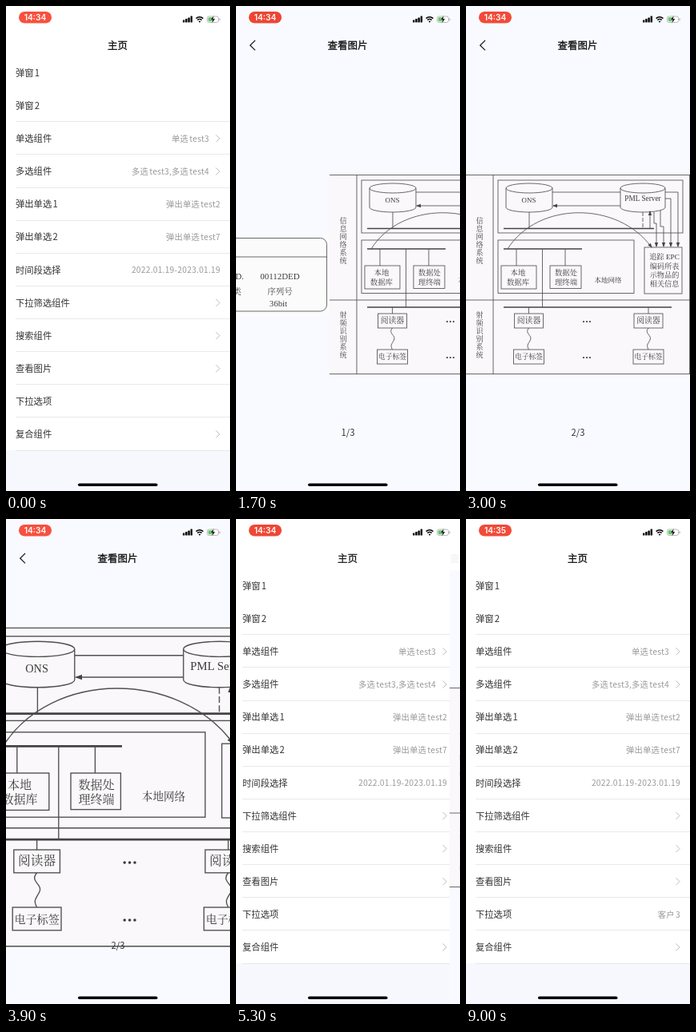
An HTML page that plays this animation: 280 px wide and 607 px high, repeating every 9100 ms.

```html
<!DOCTYPE html>
<html lang="zh-CN">
<head>
<meta charset="utf-8">
<title>主页</title>
<style>
html, body { margin: 0; width: 100%; height: 100%; overflow: hidden; background: #fff; }
#stage { display: block; width: 280px; height: 607px; font-family: "Noto Sans CJK SC", "Noto Sans CJK", "Noto Sans", sans-serif; }
.scan { font-family: "Liberation Serif", "Noto Serif CJK SC", "Noto Sans CJK SC", serif; fill: #3c3c3c; }
.scan .ink { fill: none; stroke: #505050; stroke-width: .85; }
.scan .bus { fill: none; stroke: #444; stroke-width: 1.7; }
.scan .dash { fill: none; stroke: #555; stroke-width: .9; stroke-dasharray: 5 2; }
.title { fill: #111; stroke: #111; stroke-width: .3; }
.time { font-family: Inter, sans-serif; }
</style>
</head>
<body>
<svg id="stage" viewBox="0 0 280 607"></svg>
<script>
const MID = 'middle', END = 'end';

// Text centred vertically on y
const text = (s, x, y, size, anchor = 'start', extra = '') =>
  `<text x="${x}" y="${y + size * .37}" font-size="${size}" text-anchor="${anchor}" ${extra}>${s}</text>`;
const path = (d, cls = 'ink', extra = '') => `<path class="${cls}" d="${d}" ${extra}/>`;
const arrow = (d, ends = 'marker-end="url(#tip)"') => path(d, 'ink', ends);
const box = (x, y, w, h, rx = 0) =>
  `<rect class="ink" x="${x}" y="${y}" width="${w}" height="${h}" rx="${rx}"/>`;
const label = (s, x, y, size) => text(s, x, y, size, MID);
const lines = (list, x, y, step, size) => list.map((s, i) => label(s, x, y + i * step, size)).join('');
const paper = (y, h, fill) => `<rect y="${y}" width="280" height="${h}" fill="${fill}"/>`;
const cylinder = (x, y, w, h, ry) => {
  const r = w / 2;
  return path(`M${x} ${y + ry}a${r} ${ry} 0 0 1 ${w} 0a${r} ${ry} 0 0 1 ${-w} 0V${y + h - ry}a${r} ${ry} 0 0 0 ${w} 0V${y + ry}`);
};
// Hollow block arrow; the head sits at x2
const block = (x1, x2, y) => {
  const n = x2 - Math.sign(x2 - x1) * 6;
  return path(`M${x1} ${y - 1.6}H${n}V${y - 3.6}L${x2} ${y}L${n} ${y + 3.6}V${y + 1.6}H${x1}Z`);
};
const pair = (x1, x2, y1, y2) => block(x1, x2, y1) + block(x2, x1, y2);
const oval = (x, y, rx, ry, s) =>
  `<ellipse class="ink" cx="${x}" cy="${y}" rx="${rx}" ry="${ry}"/>` + label(s, x, y, 7.4);

function codeTable() {
  const columns = [
    [40, '02.', '标头', '8bit'], [93, '0000A68.', 'EPC 管理器', '28bit'],
    [154, '00010D.', '对象类', '24bit'], [218, '00112DED', '序列号', '36bit']];
  return paper(288, 101, '#fcfbfc') +
    box(4.5, 290.5, 272, 91.5, 8) + path('M4 314H277') +
    text('产品电子码类型 1 96bit', 15, 304, 10.4) +
    columns.map(([x, code, name, bits]) =>
      label(code, x, 338, 10.9) + label(name, x, 357, 10.4) + label(bits, x - 2, 372, 10.8)).join('');
}

function networkDiagram() {
  const station = x =>
    path(`M${x} 377V385M${x} 403c-6 7 5 9 2 15s-5 6-2 12`) +
    box(x - 18, 385, 36, 18) + label('阅读器', x, 393.5, 9.8) +
    box(x - 19, 430, 38, 18) + label('电子标签', x, 439.2, 8.8);
  const side = (s, y) => lines([...s], 17, y, 9.9, 9);
  return paper(211, 250, '#faf8fa') +
    path('M0 211.5H280M34 211V461M279.5 211V461M0 368H280M0 460.5H280') +
    box(40, 218, 231, 66) + box(40, 293, 170, 66.5) +
    cylinder(50, 222, 58, 36, 6) + label('ONS', 78.5, 243, 8.9) +
    cylinder(193, 222, 56, 36, 6) + label('PML Server', 221, 241, 9.3) +
    path('M47 278.5H235M47 304H145M47 377H257', 'bus') +
    path('M79 258V278M63 304V325M124 304V325M95.5 304V377') +
    path('M221 258V278', 'dash') +
    path('M108 233H193') +
    arrow('M193 250H109') + arrow('M249 233H265V301') + arrow('M249 241H256V301') +
    arrow('M230 278V257') + arrow('M235 258V272H238V301') + arrow('M243 256V276H247V301') +
    arrow('M52 304C90 244 190 244 232 302') +
    box(44, 325, 44, 29) + lines(['本地', '数据库'], 65, 334, 11.2, 9.4) +
    box(105, 325, 39, 28.5) + lines(['数据处', '理终端'], 125, 334, 11.2, 9.4) +
    label('本地网络', 177.5, 343, 8.5) +
    box(223, 302, 47, 58) +
    lines(['追踪 EPC', '编码所表', '示物品的', '相关信息'], 248, 314, 11.2, 9.2) +
    station(78.5) + station(228) +
    [395, 440].map(y => [147, 151, 155].map(x => `<circle cx="${x}" cy="${y}" r="1.1"/>`).join('')).join('') +
    side('信息网络系统', 269) + side('射频识别系统', 387);
}

function flowDiagram() {
  const star = Array.from({ length: 28 }, (_, i) => {
    const a = i * Math.PI / 14 - Math.PI / 2, r = i % 2 ? 18 : 29;
    return `${36.5 + r * Math.cos(a)},${368 + r * 1.05 * Math.sin(a)}`;
  }).join(' ');
  const server = (y, name, below) =>
    label('EPC', 84, y - 9, 7.5) + pair(71, 100, y - 3, y + 4.5) + label(below, 88, y + 12, 7.5) +
    box(107, y - 6.5, 53, 14) + label(name, 133.5, y + .5, 7.4) +
    block(188, 215, y) + block(188, 161, y) +
    cylinder(217, y - 16, 34, 27, 4) + label('数据库', 234, y + 1.5, 7.4);
  return paper(272, 132, '#f8f6f8') +
    label('射频', 33, 276, 7.6) + oval(32, 291.5, 23.5, 11.5, 'EPC 标签') +
    label('EPC', 70, 279, 7.5) + pair(59, 87, 285.5, 295) +
    oval(112, 291, 22.5, 11.5, '阅读器') +
    label('EPC', 149, 282, 7.5) + block(138, 166, 289) +
    oval(194.5, 290.5, 22, 11.5, '中间件') + pair(222, 248, 283, 293) +
    box(251, 273, 24, 31) + lines(['企业', '应用', '软件'], 263, 281, 8.5, 7.6) +
    arrow('M237 309V298') + label('事件过滤', 238, 315, 7.2) +
    arrow('M36.5 337V317H194.5V303', 'marker-start="url(#tip)" marker-end="url(#tip)"') +
    `<polygon class="ink" points="${star}"/>` + label('Internet', 36.5, 368, 7.6) +
    server(351, 'ONS 服务器', 'IP 地址') + server(384.5, 'EPCIS 服务器', 'PML');
}

const rows = [
  ['弹窗 1'], ['弹窗 2'], ['单选组件', '单选 test3', 1], ['多选组件', '多选 test3,多选 test4', 1],
  ['弹出单选 1', '弹出单选 test2'], ['弹出单选 2', '弹出单选 test7'],
  ['时间段选择', '2022.01.19-2023.01.19'], ['下拉筛选组件', '', 1], ['搜索组件', '', 1],
  ['查看图片', '', 1], ['下拉选项', '客户 3'], ['复合组件', '', 1]];

function homeList() {
  return `<rect width="280" height="607" fill="#f6f8fd"/><rect width="280" height="556" fill="#fff"/>` +
    rows.map(([name, value, more], i) => {
      const y = 83.6 + i * 41.12;
      return text(name, 12, y, 11.3, 'start', 'fill="#333" word-spacing="-1.3"') +
        (value ? text(value, more ? 254 : 268, y + .3, 10.3, END,
          `fill="#999" letter-spacing=".22" word-spacing="-1.3" ${i === 10 ? 'id="choice"' : ''}`) : '') +
        (more ? `<path d="M262.5 ${y - 4.5}l4.5 4.5l-4.5 4.5" fill="none" stroke="#bbb"/>` : '') +
        (i ? `<rect x="12" y="${Math.round(y + 19.6)}" width="268" height=".8" fill="#e4e4e6"/>` : '');
    }).join('') +
    `<g id="menu"><rect x="177" y="311" width="83" height="143" rx="4" fill="#fff" stroke="#e6e6e8"/>` +
    [1, 2, 3, 4].map(n => text('客户 ' + n, 218, 294 + n * 35.5, 11, MID, 'fill="#333"')).join('') + '</g>';
}

function statusBar() {
  const bars = [3, 4.5, 6, 8].map((h, i) =>
    `<rect x="${221 + i * 3.2}" y="${20.5 - h}" width="2.4" height="${h}" rx=".6"/>`).join('');
  return `<rect id="pill" x="16" y="7" width="41" height="14.5" rx="7.2"/>` +
    text('14:34', 36.5, 14.3, 10.2, MID, 'id="clock" class="time" font-weight="600" fill="#fff"') + bars +
    `<path d="M237.6 15.6a6.2 6.2 0 0 1 8.8 0M239.4 17.6a3.7 3.7 0 0 1 5.2 0" fill="none" stroke="#000" stroke-width="1.5"/>
     <circle cx="242" cy="19.5" r="1.1"/>
     <rect x="251.5" y="13" width="14" height="7.5" rx="2.2" fill="#fff" stroke="#aaa" stroke-width=".8"/>
     <rect x="252.7" y="14.2" width="6.8" height="5.1" rx="1" fill="#62c767"/>
     <path d="M260 11.5l-4.5 5.7h2.8l-1.3 4.8l4.6-5.9h-2.8z" stroke="#fff" stroke-width=".4"/>
     <rect x="266.4" y="15.3" width="1.2" height="3" rx=".6" fill="#aaa"/>`;
}

// The viewer is a nested svg so that neighbouring slides are clipped
stage.innerHTML = `
  <defs><marker id="tip" viewBox="0 0 6 6" refX="5" refY="3" markerWidth="6" markerHeight="6"
    markerUnits="userSpaceOnUse" orient="auto-start-reverse"><path d="M0 .8L6 3L0 5.2Z" fill="#444"/></marker></defs>
  <g id="home">${homeList()}</g>
  <g id="viewer"><svg width="280" height="607" overflow="hidden"><rect width="280" height="607" fill="#f9faff"/>
    <g id="slides" class="scan"><g>${codeTable()}</g>
      <g transform="translate(280)"><g id="zoom">${networkDiagram()}</g></g>
      <g transform="translate(560)">${flowDiagram()}</g></g>
    ${text('1/3', 140, 534, 11.2, MID, 'id="count" fill="#333"')}</svg></g>
  <rect width="280" height="64" fill="#fff"/>
  <rect id="tint" width="280" height="64" fill="#f9faff"/>
  ${text('主页', 139.5, 49, 12.5, MID, 'id="homeTitle" class="title"')}
  ${text('查看图片', 139.5, 49, 12.5, MID, 'id="viewTitle" class="title"')}
  <path id="back" d="M24 43l-6.3 6.2l6.3 6.2" fill="none" stroke="#222" stroke-width="1.3"/>
  ${statusBar()}
  <rect x="90" y="597.5" width="99.5" height="3.6" rx="1.8"/>`;

const el = id => document.getElementById(id);
const move = (id, value) => el(id).setAttribute('transform', value);
const fade = (id, value) => { el(id).style.opacity = value; };
const ramp = (t, a, b) => Math.min(1, Math.max(0, (t - a) / (b - a)));
const smooth = (t, a, b) => { const u = ramp(t, a, b); return u * u * (3 - 2 * u); };
const easeOut = (t, a, b) => 1 - (1 - ramp(t, a, b)) ** 3;
// Critically damped navigation spring
const spring = (t, start) => { const u = Math.max(0, t - start) * .016; return 1 - (1 + u) * Math.exp(-u); };

function draw(t) {
  const open = spring(t, 400) - spring(t, 5000);
  move('home', `translate(${-84 * open})`);
  move('viewer', `translate(${280 * (1 - open)})`);
  move('viewTitle', `translate(${160 * (1 - open)})`);
  fade('tint', open);
  fade('homeTitle', 1 - open);
  fade('viewTitle', open);
  fade('back', open * open);

  const page = easeOut(t, 1600, 2000) + easeOut(t, 2050, 2350) - easeOut(t, 2600, 2950);
  move('slides', `translate(${-280 * page})`);
  el('count').textContent = (t < 2050 ? 1 : t < 2300 || t >= 2850 ? 2 : 3) + '/3';
  const zoom = smooth(t, 3200, 3800) - smooth(t, 4200, 4700);
  move('zoom', `translate(${-87 * zoom} ${-202 * zoom}) scale(${1 + .6 * zoom})`);

  fade('menu', ramp(t, 6300, 6500) - ramp(t, 7400, 7550));
  fade('choice', t < 7500 ? 0 : 1);
  el('clock').textContent = t < 8500 ? '14:34' : '14:35';
  const glow = Math.cos(t * Math.PI / 2000) * 6;
  el('pill').setAttribute('fill', `rgb(${242 + glow} ${74 + glow} ${56 + glow})`);
}

const begin = performance.now();
function tick() {
  draw((performance.now() - begin) % 9100);
  requestAnimationFrame(tick);
}
tick();
</script>
</body>
</html>
```
